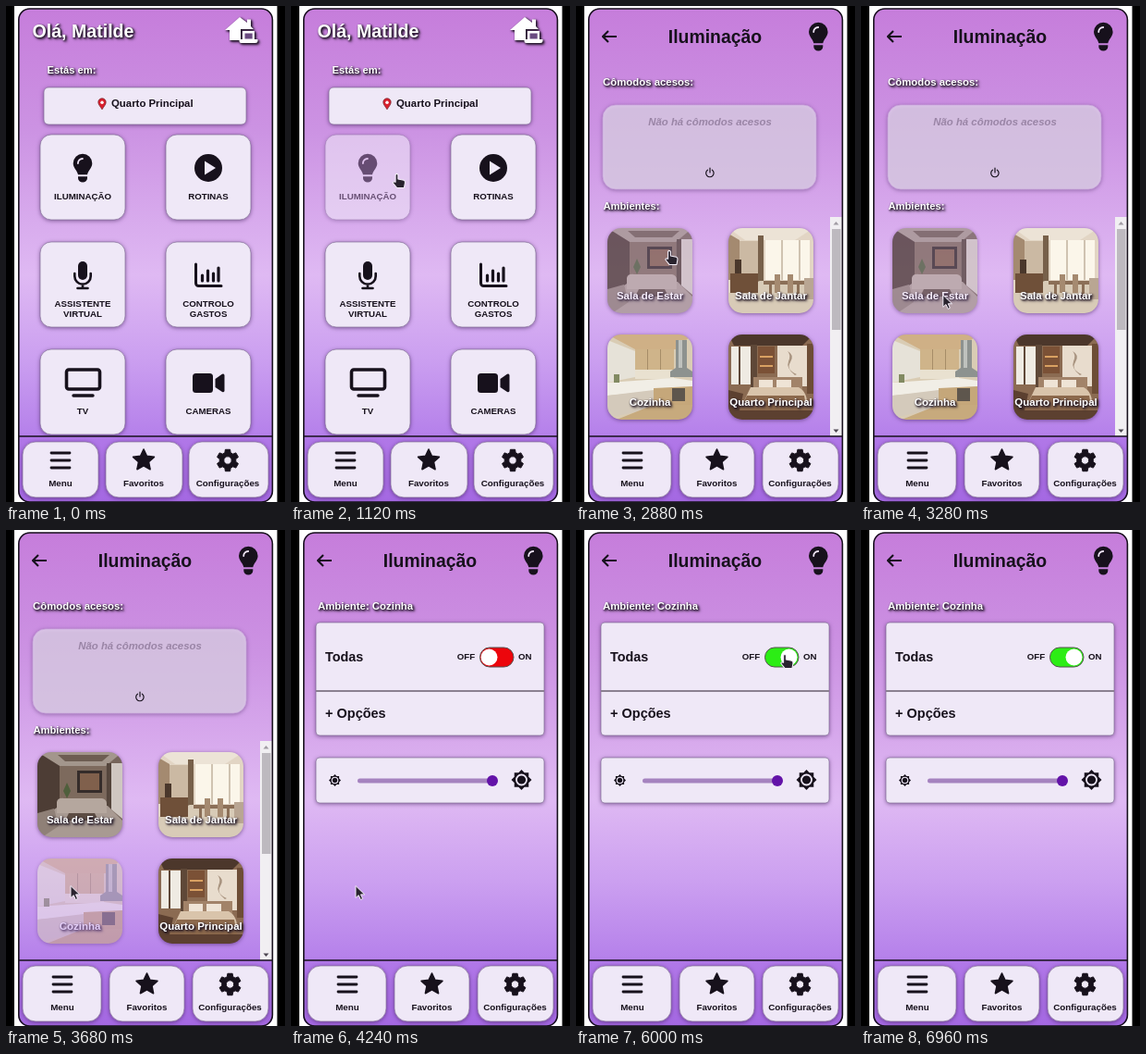
These frames come from a looping animation (302 by 536 pixels, 7040 ms). An HTML page:

```html
<!DOCTYPE html>
<html lang="pt">
<head>
<meta charset="utf-8">
<title>Casa inteligente</title>
<style>
html, body { margin: 0; width: 100%; height: 100%; overflow: hidden; background: #000; }
svg { display: block; width: 100vw; height: 100vh; }
text { font-family: "Liberation Sans", Arial, sans-serif; font-weight: bold; fill: #17111c; }
.lit { fill: #fff; filter: drop-shadow(1px 1px 1px #1a1020) drop-shadow(1px 1px 1px #1a1020bb); }
.shade { filter: drop-shadow(0 1px 2px #38185088); }
.ink { fill: #17111c; }
.line { fill: none; stroke: #17111c; }
.photo { filter: blur(.6px); }
</style>
</head>
<body>
<svg id="stage" viewBox="0 0 302 536" preserveAspectRatio="none"></svg>
<script>
const LOOP = 7040, STEP = 80;
const INK = '#17111c', PAPER = '#efe8f7';

const text = (s, x, y, size, extra = '') => `<text x="${x}" y="${y}" font-size="${size}" ${extra}>${s}</text>`;
const mid = (s, x, y, size, extra = '') => text(s, x, y, size, 'text-anchor="middle" ' + extra);
const lit = (s, x, y, size) => text(s, x, y, size, 'class="lit"');
const box = (x, y, w, h, r, fill = PAPER, extra = '') =>
  `<rect x="${x}" y="${y}" width="${w}" height="${h}" rx="${r}" fill="${fill}" ${extra}/>`;
const path = (d, extra = 'class="ink"') => `<path d="${d}" ${extra}/>`;
const line = (d, w, extra = '') => path(d, `class="line" stroke-width="${w}" ${extra}`);
const at = (x, y, body, extra = '') => `<g transform="translate(${x} ${y})" ${extra}>${body}</g>`;
const edge = 'stroke="#86719a" stroke-width=".7" class="shade"';

// Closed polygon from polar points [radius, angle]
const polar = pts => 'M' + pts.map(([r, a]) =>
  (r * Math.sin(a)).toFixed(2) + ' ' + (-r * Math.cos(a)).toFixed(2)).join('L') + 'Z';
const ring = r => `M${r} 0A${r} ${r} 0 1 0 ${-r} 0A${r} ${r} 0 1 0 ${r} 0Z`;

function star(r) {
  const pts = Array.from({ length: 10 }, (_, i) => [i % 2 ? r * 0.48 : r, i * Math.PI / 5]);
  return path(polar(pts), `class="ink" stroke="${INK}" stroke-width="1.6" stroke-linejoin="round"`);
}

function gear(r) {
  const pts = [];
  for (let i = 0; i < 6; i++) {
    const a = i * Math.PI / 3;
    pts.push([r * 0.74, a - 0.36], [r, a - 0.22], [r, a + 0.22], [r * 0.74, a + 0.36]);
  }
  return path(polar(pts) + ring(r * 0.35),
    `class="ink" fill-rule="evenodd" stroke="${INK}" stroke-width="1" stroke-linejoin="round"`);
}

function sun(r) {
  const pts = Array.from({ length: 16 }, (_, i) => [i % 2 ? r * 0.76 : r, i * Math.PI / 8]);
  return path(polar(pts)) + `<circle r="${r * 0.5}" fill="none" stroke="${PAPER}" stroke-width="${r * 0.16}"/>`;
}

const bulb = path('M0 10a10.3 10.3 0 0 1 20.6 0c0 5-4.2 7.5-5.3 12.3h-10c-1.1-4.8-5.3-7.3-5.3-12.3z')
  + path('M5.3 24.3h10v1.7a5 4.6 0 0 1-10 0z')
  + path('M5.2 10a5 5 0 0 1 5-5', 'fill="none" stroke="#efe4f6" stroke-width="1.8" stroke-linecap="round"');

// Icons centred on their own origin
const icons = {
  bulb: at(-10.3, -15, bulb),
  play: `<circle r="15" class="ink"/>` + path('M-4-7.5L8 0L-4 7.5Z', `fill="${PAPER}"`),
  mic: box(-5, -15, 10, 20, 5, INK) + line('M-8.7-2V1a8.7 8.7 0 0 0 17.4 0V-2M0 9.5V14M-5.5 14H5.5', 2.6, 'stroke-linecap="round"'),
  chart: line('M-13.5-12V8.5a3 3 0 0 0 3 3H14', 3, 'stroke-linecap="round"')
    + line('M-6.5 0V6M-.5-5V6M5.5-2V6M11-8V6', 3.2, 'stroke-linecap="round"'),
  tv: box(-17.5, -14, 36, 21, 2.5, 'none', 'class="line" stroke-width="3.6"') + line('M-10 14H11', 3.4, 'stroke-linecap="round"'),
  camera: box(-17, -10, 22, 21, 3.5, INK) + path('M7.5-4L15-9.2Q17.5-10 17.5-7.5V8.5Q17.5 11 15 10L7.5 5Z')
};

function card(id, x, y, icon, rows) {
  const labels = rows.map((s, i) => mid(s, 46, 70.2 + 11 * i, 9.7)).join('');
  return at(x, y, box(0, 0, 92, 92, 12, PAPER, edge) + at(46, 36, icons[icon]) + labels, `id="${id}"`);
}

function footer(slots) {
  const art = [line('M-10-8H10M-10 0H10M-10 8H10', 2.8, 'stroke-linecap="round"'), star(12), gear(12)];
  const names = ['Menu', 'Favoritos', 'Configurações'];
  return box(14, 465, 274, 71, 0, 'url(#foot)') + line('M14 465H288', 1.6)
    + slots.map(([x, w, c], i) => box(x, 471, w, 60, 14, PAPER, edge)
      + at(c, 491, art[i]) + mid(names[i], c, 518.5, 9.8)).join('');
}

const frame = body => `<g clip-path="url(#phone)">${box(13, 2.5, 276, 534, 12, 'url(#page)')}${body}</g>`
  + box(13.8, 3, 274.6, 533, 12, 'none', 'class="line" stroke-width="1.6"');

const house = at(237, 12,
  path('M0 14L16 0L24 6V2.5H28V10L31 13H17V25H5V14Z', '')
  + path('M19 15H32V24H35.5V26Q35.5 28 33 28H17.5Q15.5 28 15.5 26V24H19Z', '')
  + path('M21.5 17.5H29.7V23.5H21.5Z', 'fill="#6a4a80"'), 'class="lit"');

const pin = at(104, 106,
  path('M0 5.8C-2 2.5-4.2.5-4.2-2A4.2 4.2 0 0 1 4.2-2C4.2.5 2 2.5 0 5.8Z', 'fill="#d9202e" stroke="#70202a" stroke-width=".7"')
  + '<circle cy="-1.8" r="1.7" fill="#fff"/>');

const home = frame(
  lit('Olá, Matilde', 28.5, 34, 19.6) + house + lit('Estás em:', 44.5, 73, 11.2)
  + box(41, 88, 219, 40, 5, PAPER, edge) + pin + text('Quarto Principal', 114, 109.3, 11.4)
  + card('lights', 37, 139, 'bulb', ['ILUMINAÇÃO']) + card('routines', 173, 139, 'play', ['ROTINAS'])
  + card('assistant', 37, 255, 'mic', ['ASSISTENTE', 'VIRTUAL']) + card('costs', 173, 255, 'chart', ['CONTROLO', 'GASTOS'])
  + card('tv', 37, 371, 'tv', ['TV']) + card('cams', 173, 371, 'camera', ['CAMERAS'])
  + footer([[18, 82, 59], [108, 83, 149], [198, 86, 240]]));

const header = line('M44 33H29M35 27L29 33L35 39', 2.2, 'stroke-linejoin="round"')
  + mid('Iluminação', 150.5, 40, 19.4) + at(252, 18, bulb);
const innerFooter = footer([[18, 85, 61], [112, 81, 152.5], [202, 82, 242.5]]);

// Room pictures: a base tone and flat shapes in a 92 x 92 tile
const rooms = {
  living: ['#76655b', ['#a3968c', 'M0 0H92L74 15H24Z'], ['#6d5d52', 'M22 3H78L70 10H30Z'],
    ['#4d3d35', 'M0 0L24 15V62L0 76Z'], ['#7d6a5d', 'M24 15H74V56H24Z'], ['#352c2a', 'M43 20H70V44H43Z'],
    ['#80604c', 'M46 23H67V41H46Z'], ['#cfc7c1', 'M80 12H92V72L80 62Z'], ['#54453c', 'M75 12H80V63H75Z'],
    ['#4f5f3c', 'M28 42L32 33L36 42L32 50Z'], ['#a89a92', 'M0 74L24 58H76L92 74V92H0Z'],
    ['#b5a79e', 'M21 54Q22 49 29 50H70Q75 51 75 56V66H21Z'], ['#5d4d44', 'M34 66H62L66 74H30Z'],
    ['#8f8077', 'M0 66L18 61L23 80L5 92H0Z']],
  dining: ['#e2d5c4', ['#ece3d6', 'M0 0H92L72 13H18Z'], ['#a48a70', 'M0 6L12 13V56H0Z'],
    ['#cbb9a3', 'M12 14H32V52H12Z'], ['#fbf6ea', 'M40 13H88V56H40Z'], ['#cfc3b1', 'M57 13H59V56H57ZM76 13H78V56H76Z'],
    ['#77604a', 'M32 8H38V58H32Z'], ['#d8cbb7', 'M0 70L34 57H92V92H0Z'],
    ['#6f5039', 'M2 49H32V70H2Z'], ['#4a372b', 'M7 34H14V49H7Z'], ['#8b6f57', 'M38 57H82V61H38ZM44 61H47V77H44ZM74 61H77V77H74Z'],
    ['#a58a70', 'M50 50H56V70H50ZM64 50H70V70H64Z'], ['#b9a693', 'M82 54H92V77H82Z']],
  kitchen: ['#d9ccb4', ['#cfb086', 'M0 0H92L74 16H30Z'], ['#e6e2d8', 'M0 6L30 18V46L0 52Z'],
    ['#cfb48a', 'M30 16H72V38H30Z'], ['#e9e1d0', 'M30 38H72V48H30Z'],
    ['#a68d68', 'M43 16H44V38H43ZM57 16H58V38H57Z'], ['#8d928f', 'M74 6H86V36L92 40V46H68V40L74 36Z'],
    ['#bfc2bd', 'M77 6H81V36H77Z'], ['#f1eee6', 'M0 52L72 47L92 50V58L0 66Z'], ['#d4cabb', 'M0 66L50 60V80L0 90Z'],
    ['#c5a77a', 'M50 58L92 56V76L50 78Z'], ['#5e564d', 'M70 58H84V72H70Z'],
    ['#c7aa7d', 'M10 92L50 76H92V92Z'], ['#828a62', 'M7 43H13V52H7Z']],
  bedroom: ['#8b6b52', ['#4c372b', 'M0 0H92L80 12H6Z'], ['#efebe3', 'M3 13H26V54H3Z'],
    ['#5f4838', 'M11 13H13V54H11ZM24 11H31V58H24Z'], ['#7b5136', 'M32 13H50V42H32Z'], ['#d9a162', 'M34 23H48V25H34ZM34 33H48V35H34Z'],
    ['#e8dccd', 'M53 12H85V56H53Z'], ['#a8937f', 'M64 18Q72 22 67 30T74 43L72 44Q62 36 65 29T64 18Z'], ['#6d4d36', 'M85 10H92V64H85Z'],
    ['#a28369', 'M27 46H80V64H27Z'], ['#efe4d6', 'M33 49H48V58H33ZM52 49H68V58H52Z'],
    ['#d9c4ab', 'M24 57H76Q86 62 85 78H14Z'], ['#8c694c', 'M20 66H82L85 82H12Z'], ['#5c4030', 'M0 60L16 64L12 82H92V92H0Z']]
};

function room(id, x, y, label) {
  const [base, ...shapes] = rooms[id];
  const art = box(-4, -4, 100, 100, 0, base) + shapes.map(([c, d]) => path(d, `fill="${c}"`)).join('');
  return at(x, y, `<g class="shade"><g clip-path="url(#tile)"><g class="photo">${art}</g></g></g>`
    + mid(label, 46, 77.3, 11.5, 'class="lit"'), `id="${id}"`);
}

const list = frame(
  header + lit('Cômodos acesos:', 29, 86, 11.4)
  + box(29, 107, 231, 91, 14, PAPER, 'fill-opacity=".68" stroke="#c9a8dc" stroke-width=".8" class="shade"')
  + mid('Não há cômodos acesos', 145, 128.5, 11.4, 'font-style="italic" style="fill:#9a85a6"')
  + line('M142.4 177.2A4.2 4.2 0 1 0 147.4 177.2M145 175V180', 1.2, 'stroke-linecap="round"')
  + lit('Ambientes:', 29.5, 220, 11.2)
  + room('living', 34, 240, 'Sala de Estar') + room('dining', 165, 240, 'Sala de Jantar')
  + room('kitchen', 34, 355, 'Cozinha') + room('bedroom', 165, 355, 'Quarto Principal')
  + box(275, 228, 13, 237, 0, '#f1eff2') + box(277, 241, 9.5, 109, 0, '#bdb9bf')
  + path('M278.5 236.5L281.5 233L284.5 236.5Z', 'fill="#a09ba3"') + path('M278.5 457.5L281.5 461L284.5 457.5Z', 'fill="#4b454f"')
  + innerFooter);

const detail = frame(
  header + lit('Ambiente: Cozinha', 29, 86, 11.4)
  + box(27, 100, 247, 122, 4, PAPER, edge) + path('M27 174H274', 'stroke="#8a8090" stroke-width="1.8"')
  + text('Todas', 37, 142, 14.4) + text('+ Opções', 37, 202.5, 14.5)
  + text('OFF', 179.8, 140.3, 9.7) + text('ON', 246, 140.3, 9.7)
  + box(204.5, 127, 36.5, 21, 10.5, '#ec060c', 'id="track" stroke="#55504f" stroke-width="1"')
  + '<circle id="knob" cy="137.5" r="9" fill="#fff"/>'
  + box(27, 246, 247, 49, 4, PAPER, edge) + box(72, 268.5, 146, 5, 2.5, '#a583bf')
  + '<circle cx="218" cy="271" r="6" fill="#6312a8"/>' + at(47.5, 270.5, sun(6.5)) + at(249.5, 270, sun(11))
  + innerFooter);

const grad = (id, ...stops) => `<linearGradient id="${id}" x2="0" y2="1">${stops.map(([o, c]) =>
  `<stop offset="${o}" stop-color="${c}"/>`).join('')}</linearGradient>`;
const pointer = 'stroke="#f4eef8" stroke-width="1" stroke-linejoin="round" fill="#29232e"';

const stage = document.getElementById('stage');
stage.innerHTML = `<defs>
${grad('page', [0, '#c67ddb'], [0.25, '#cc93e3'], [0.54, '#dfb9f3'], [0.71, '#cb9ff0'], [0.87, '#b47fea'])}
${grad('foot', [0, '#b178e8'], [1, '#a468e2'])}
<clipPath id="phone"><rect x="13" y="2.5" width="276" height="534" rx="12"/></clipPath>
<clipPath id="tile"><rect width="92" height="92" rx="15"/></clipPath></defs>
<rect width="302" height="536"/><rect x="9" width="284.5" height="536" fill="#fff"/>
<g id="home">${home}</g><g id="list">${list}</g><g id="detail">${detail}</g>
<g id="cursor"><g id="arrow">${path('M0 0V13L3.2 10.2L5.4 15L7.6 14L5.5 9.4H9.7Z', pointer)}</g>
<g id="hand" transform="translate(0 -1.2) scale(1.08)">${path('M-1.3 1Q0-.8 1.3 1V5.2L7 6.4Q8.6 7 8.3 9L7.4 14H0L-3.8 9.2Q-4 7.2-1.3 8.3Z', pointer)}</g></g>`;

const el = id => document.getElementById(id);
const show = (id, on) => { el(id).style.display = on ? '' : 'none'; };
const clamp = v => Math.min(1, Math.max(0, v));
const ease = v => v * v * (3 - 2 * v);
const fade = (t, from, to) => 1 - 0.43 * (ease(clamp((t - from) / 320)) - ease(clamp((t - to) / 320)));

// [time, x, y] of the pointer tip
const route = [[240, 288, 430], [960, 114.5, 182.5], [1520, 114.5, 182.5], [1840, 100, 182.5], [2240, 100, 182.5],
  [2800, 101, 265.5], [3040, 101, 265.5], [3600, 70, 384.5], [4320, 70, 384.5], [5040, 226, 135.5],
  [6080, 226, 135.5], [6720, 288, 240]];
const hands = [[800, 2240], [2720, 3120], [4960, 6240]];

function tip(t) {
  const i = route.findIndex(p => p[0] > t);
  if (i < 1) return null;
  const [a, b] = [route[i - 1], route[i]];
  const k = ease((t - a[0]) / (b[0] - a[0]));
  return [a[1] + (b[1] - a[1]) * k, a[2] + (b[2] - a[2]) * k];
}

function draw(t) {
  show('home', t < 1520);
  show('list', t >= 1520 && t < 4240);
  show('detail', t >= 4240);
  el('lights').style.opacity = fade(t, 800, 1600);
  el('living').style.opacity = fade(t, 2720, 3120);
  el('kitchen').style.opacity = fade(t, 3360, 4400);

  const on = ease(clamp((t - 5520) / 320));
  el('knob').setAttribute('cx', 214.5 + 16 * on);
  el('track').setAttribute('fill', `rgb(${236 - 192 * on},${6 + 231 * on},${12 + 9 * on})`);

  const p = tip(t);
  show('cursor', p);
  if (p) el('cursor').setAttribute('transform', `translate(${p[0]} ${p[1]})`);
  const hand = hands.some(([a, b]) => t >= a && t < b);
  show('hand', hand);
  show('arrow', !hand);
}

const start = performance.now();
function tick() {
  const t = (performance.now() - start) % LOOP;
  draw(Math.floor(t / STEP) * STEP);
  requestAnimationFrame(tick);
}
tick();
</script>
</body>
</html>
```
